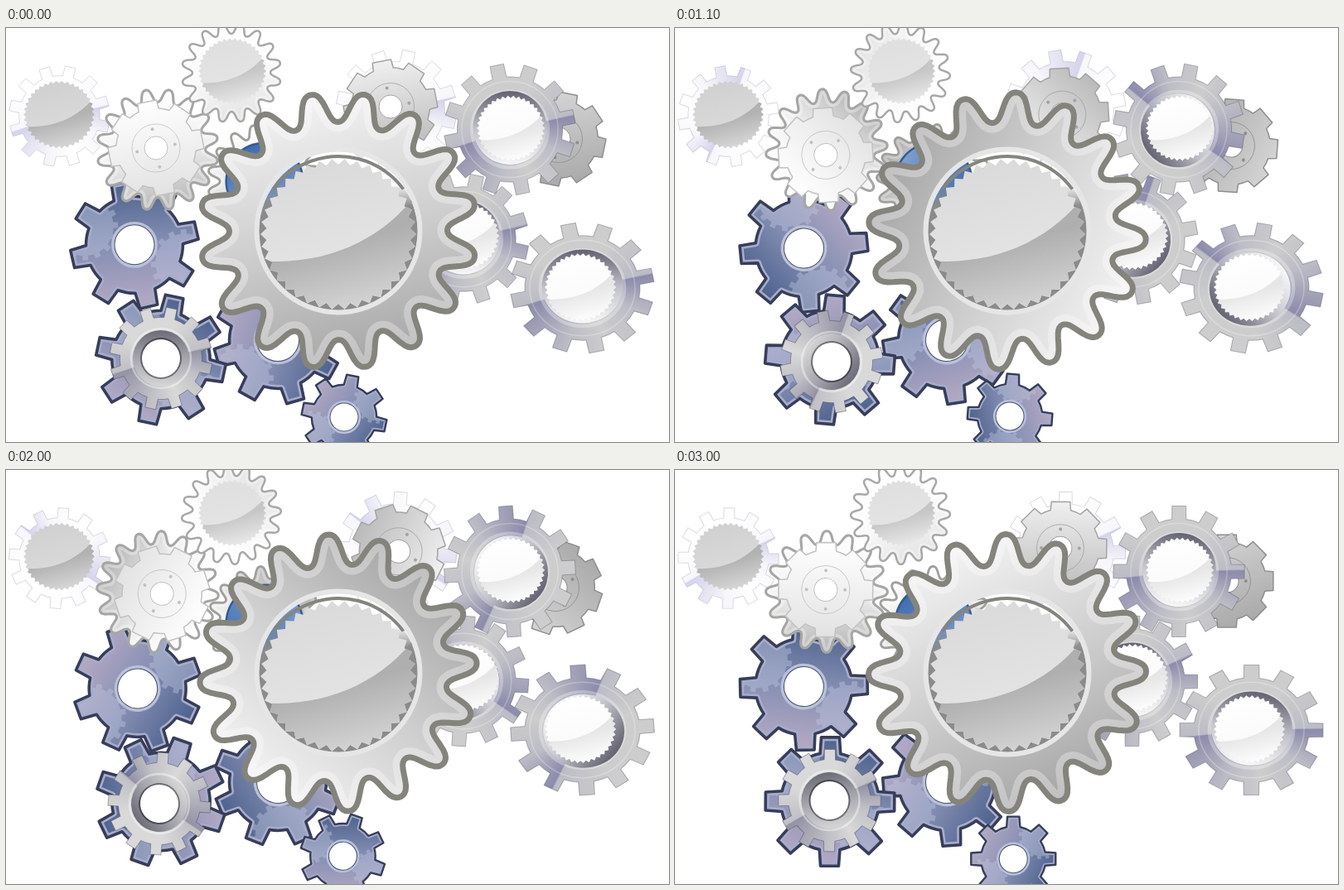
An HTML page with a canvas that plays this animation: 800 by 500 pixels, repeating every 3100 ms.

```html
<!DOCTYPE html>
<html lang="en">
<head>
<meta charset="utf-8">
<title>Gears</title>
<style>
  html, body { margin: 0; width: 100%; height: 100%; overflow: hidden; background: #fff; }
  canvas { display: block; }
</style>
</head>
<body>
<canvas id="stage" width="800" height="500"></canvas>
<script>
const ctx = document.getElementById('stage').getContext('2d');
const TAU = Math.PI * 2, DEG = Math.PI / 180;
const STEPS = 31, STEP_MS = 100;
const CW = 1, CCW = -1;
let turn = 0;

// Run draw() in coordinates that turn around a pivot; (ox, oy) makes the part eccentric.
function spin(x, y, dir, draw, { ox = 0, oy = 0, sx = 1, sy = 1 } = {}) {
  ctx.save();
  ctx.translate(x, y);
  ctx.scale(sx, sy);
  ctx.rotate(dir * turn);
  ctx.translate(ox, oy);
  draw();
  ctx.restore();
}

function linear(angle, r, ...colors) {
  const dx = Math.cos(angle * DEG) * r, dy = Math.sin(angle * DEG) * r;
  const g = ctx.createLinearGradient(-dx, -dy, dx, dy);
  colors.forEach((c, i) => g.addColorStop(i / (colors.length - 1), c));
  return g;
}

function disc(x, y, r, fill) {
  ctx.beginPath();
  ctx.arc(x, y, r, 0, TAU);
  ctx.fillStyle = fill;
  ctx.fill();
}

function ring(r, color, width) {
  ctx.beginPath();
  ctx.arc(0, 0, r, 0, TAU);
  outline(null, color, width);
}

function outline(path, color, width) {
  ctx.strokeStyle = color;
  ctx.lineWidth = width;
  path ? ctx.stroke(path) : ctx.stroke();
}

// Gear with straight teeth; tip and base are half widths in radians.
function teeth(n, R, root, tip, base, phase) {
  const p = new Path2D();
  const at = (r, a) => p.lineTo(Math.cos(a) * r, Math.sin(a) * r);
  for (let i = 0; i < n; i++) {
    const a = phase * DEG + i * TAU / n;
    at(root, a - base);
    at(R, a - tip);
    at(R, a + tip);
    p.arc(0, 0, root, a + base, a + TAU / n - base);
  }
  p.closePath();
  return p;
}

// Rounded teeth: a cosine with flattened crests.
function wave(phase) {
  const p = new Path2D();
  for (let d = 0; d < 360; d++) {
    const bump = Math.tanh(1.1 * Math.cos(16 * (d - phase) * DEG)) / Math.tanh(1.1);
    const r = 149.5 + 18 * bump;
    p.lineTo(Math.cos(d * DEG) * r, Math.sin(d * DEG) * r);
  }
  p.closePath();
  return p;
}

// Gear with rounded teeth, 171 units in radius before scaling.
function wavy(scale, light, mid, dark, edge, open) {
  ctx.scale(scale, scale);
  const rim = wave(11), body = new Path2D(rim);
  if (open) {
    body.moveTo(96, 0);
    body.arc(0, 0, 96, 0, TAU);
  }
  ctx.lineJoin = 'round';
  ctx.fillStyle = linear(77, 165, light, mid, dark);
  ctx.fill(body, 'evenodd');
  ctx.save();
  ctx.clip(body, 'evenodd');
  outline(rim, 'rgba(255,255,255,.3)', 24);
  ctx.restore();
  outline(rim, edge, 7);
}

// Silver gear shaded by two lobes.
function silver(R, light, mid, dark, edge, phase, hole) {
  const body = teeth(12, R, R * .8, .105, .135, phase);
  const g = ctx.createConicGradient(-12 * DEG, 0, 0);
  [[0, dark], [.1, mid], [.22, light], [.32, mid], [.48, dark], [.485, mid],
   [.62, light], [.85, light], [.995, mid], [1, dark]].forEach(s => g.addColorStop(...s));
  ctx.fillStyle = g;
  ctx.fill(body);
  outline(body, edge, 1);
  if (!hole) return;
  ring(R * .73, 'rgba(255,255,255,.25)', 1.5);
  ring(hole + 1.5, 'rgba(255,255,255,.3)', 4);
  disc(0, -2, hole, linear(90, hole, '#666675', '#c2c2ca', '#fafafa'));
}

function blue(R, phase, blueSide, hole) {
  const body = teeth(8, R - 1.5, R * .74, .14, .21, phase);
  ctx.lineJoin = 'round';
  ctx.fillStyle = linear(blueSide + 180, R * .9, '#4f648f', '#868fb3', '#b3a8c3');
  ctx.fill(body);
  ctx.save();
  ctx.clip(body);
  for (const a of [205, 385]) {
    ctx.save();
    ctx.rotate((a + blueSide + 90) * DEG);
    ctx.translate(R * .82, 0);
    ctx.fillStyle = 'rgba(190,198,222,.42)';
    ctx.fill(teeth(16, R * .52, R * .45, .08, .1, 0));
    ctx.restore();
  }
  outline(body, '#a6adca', R * .11);
  ctx.restore();
  outline(body, '#383d5a', R * .045);
  ring(hole + 2, '#b9c0d8', R * .06);
  ring(hole, '#4b5270', 2);
  disc(0, 0, hole, '#fff');
}

function plate(R, light, dark, edge, phase, hole) {
  const body = teeth(8, R, R * .83, .2, .26, phase);
  ctx.lineJoin = 'round';
  ctx.fillStyle = linear(80, R, light, dark);
  ctx.fill(body);
  outline(body, edge, 1.5);
  ring(R * .5, edge, .8);
  for (let i = 0; i < 4; i++) {
    const a = (phase + i * 90) * DEG;
    disc(Math.cos(a) * R * .4, Math.sin(a) * R * .4, 2, edge);
  }
  disc(0, 0, hole, '#fff');
  ring(hole, edge, 1);
}

// Fixed glossy disc with a zigzag rim.
function hub(x, y, rx, ry, top, topEnd, low, lowEnd) {
  ctx.save();
  ctx.translate(x, y);
  ctx.scale(rx, ry);
  ctx.beginPath();
  for (let i = 0; i < 76; i++) {
    const r = i % 2 ? .925 : 1, a = i * TAU / 76;
    ctx.lineTo(Math.cos(a) * r, Math.sin(a) * r);
  }
  ctx.closePath();
  ctx.fillStyle = linear(75, 1, top, topEnd);
  ctx.fill();
  ctx.clip();
  ctx.beginPath();
  ctx.moveTo(-1.1, .34);
  ctx.bezierCurveTo(-.2, .46, .62, .07, 1.05, -.61);
  ctx.lineTo(1.1, 1.1);
  ctx.lineTo(-1.1, 1.1);
  const g = ctx.createLinearGradient(.1, .1, .35, 1);
  g.addColorStop(0, low);
  g.addColorStop(1, lowEnd);
  ctx.fillStyle = g;
  ctx.fill();
  ctx.restore();
}

const paleHub = (x, y, rx, ry) => hub(x, y, rx, ry, '#ffffff', '#f8f8f8', '#e6e6e6', '#ffffff');
const white = (R, phase) => silver(R, '#ffffff', '#f7f7fb', '#d5d4ec', 'rgba(150,150,175,.35)', phase);
const steel = (R, phase) => silver(R, '#cdcdcd', '#bcbcc6', '#8c8bab', 'rgba(80,80,100,.4)', phase, 44.5);

function bigGear() {
  ctx.save();
  ctx.beginPath();
  ctx.arc(401, 247, 96, 0, TAU);
  ctx.clip();
  const shade = ctx.createLinearGradient(0, 188, 0, 215);
  shade.addColorStop(0, 'rgba(139,139,139,0)');
  shade.addColorStop(1, '#8b8b8b');
  ctx.fillStyle = shade;
  ctx.fillRect(300, 150, 202, 200);
  ctx.restore();
  hub(401, 249, 94, 91, '#dadada', '#e8e8e8', '#afafaf', '#d6d6d6');

  spin(401, 245, CW, () => {
    wavy(1, '#f3f3f3', '#cfcfcf', '#a6a6a6', '#84847d', true);
    ring(98.5, '#e6e6e6', 6);
  });
  ctx.beginPath();
  ctx.ellipse(401, 251, 97, 96, 0, 1.2 * Math.PI, 1.8 * Math.PI);
  outline(null, '#85857f', 4);
}

function scene() {
  ctx.fillStyle = '#fff';
  ctx.fillRect(0, 0, 800, 500);

  // Right side
  spin(471, 99, CW, () => white(73, 12));
  spin(468, 99, CCW, () => plate(57, '#f0f0f0', '#bababa', '#a4a4a4', -11, 14), { ox: -4, oy: -4 });
  spin(667, 139, CW, () => plate(57, '#d4d4d4', '#a9a9a9', '#8e8e8e', 11.6, 14), { oy: -5 });
  spin(552, 255, CW, () => steel(79, 12));
  paleHub(552, 251, 43, 41);
  spin(608, 122.5, CCW, () => steel(79.5, 18.5));
  paleHub(609, 121, 41, 39.5);
  spin(695.5, 314, CCW, () => steel(79, 18.5), { sx: 1.1 });
  paleHub(693, 313, 43, 41);

  // Behind the large gear
  spin(312, 185, CW, () => {
    wavy(.41, '#ffffff', '#e6e6e6', '#a9a9a9', '#a0a09c');
    disc(0, 0, 116, '#36588f');
    disc(0, 0, 110, linear(250, 110, '#7fa0d0', '#3f6db0'));
  });
  spin(328, 377, CCW, () => blue(79, 29, 20, 25));

  // Left side
  spin(64.5, 106.5, CW, () => white(61, 12.5));
  hub(64, 104.5, 43, 41, '#d0d0d0', '#dedede', '#b2b2b2', '#dadada');
  spin(156.3, 263.8, CCW, () => blue(79, 32, -95, 23.5), { ox: -1.3, oy: -2 });
  spin(183, 147, CCW, () => wavy(.438, '#ffffff', '#f2f2f2', '#b4b4b4', '#a6a6a4'));
  spin(183.5, 149, CCW, () => plate(58, '#ffffff', '#e2e2e2', '#c2c2c2', -11, 14), { ox: -2.5, oy: -4 });
  spin(272, 54, CW, () => wavy(.358, '#ffffff', '#fafafa', '#e2e2e2', '#a8a8a6'));
  hub(273, 52, 41, 40, '#dfdfdf', '#e6e6e6', '#c6c6c6', '#ececec');

  // Bottom
  spin(187, 400.5, CW, () => blue(80, 12, -60, 25));
  spin(187, 401.5, CW, () => {
    silver(62, '#d9d9d9', '#c0c0c6', '#9493a5', 'rgba(70,70,90,.45)', 12);
    ring(36, 'rgba(255,255,255,.4)', 2.5);
    disc(0, 0, 34, linear(90, 34, '#6c6c78', '#a6a6ae', '#d6d6d6'));
    disc(0, 0, 25, linear(90, 25, '#45454f', '#77777f'));
    disc(0, 0, 23, '#fff');
  }, { oy: -2.5 });
  spin(406.3, 468.5, CW, () => blue(53, 11.6, 38, 16.5), { ox: 1.7, oy: 1.5 });

  bigGear();
}

function frame() {
  turn = Math.floor(performance.now() / STEP_MS) % STEPS * TAU / STEPS;
  scene();
  requestAnimationFrame(frame);
}
frame();
</script>
</body>
</html>
```
